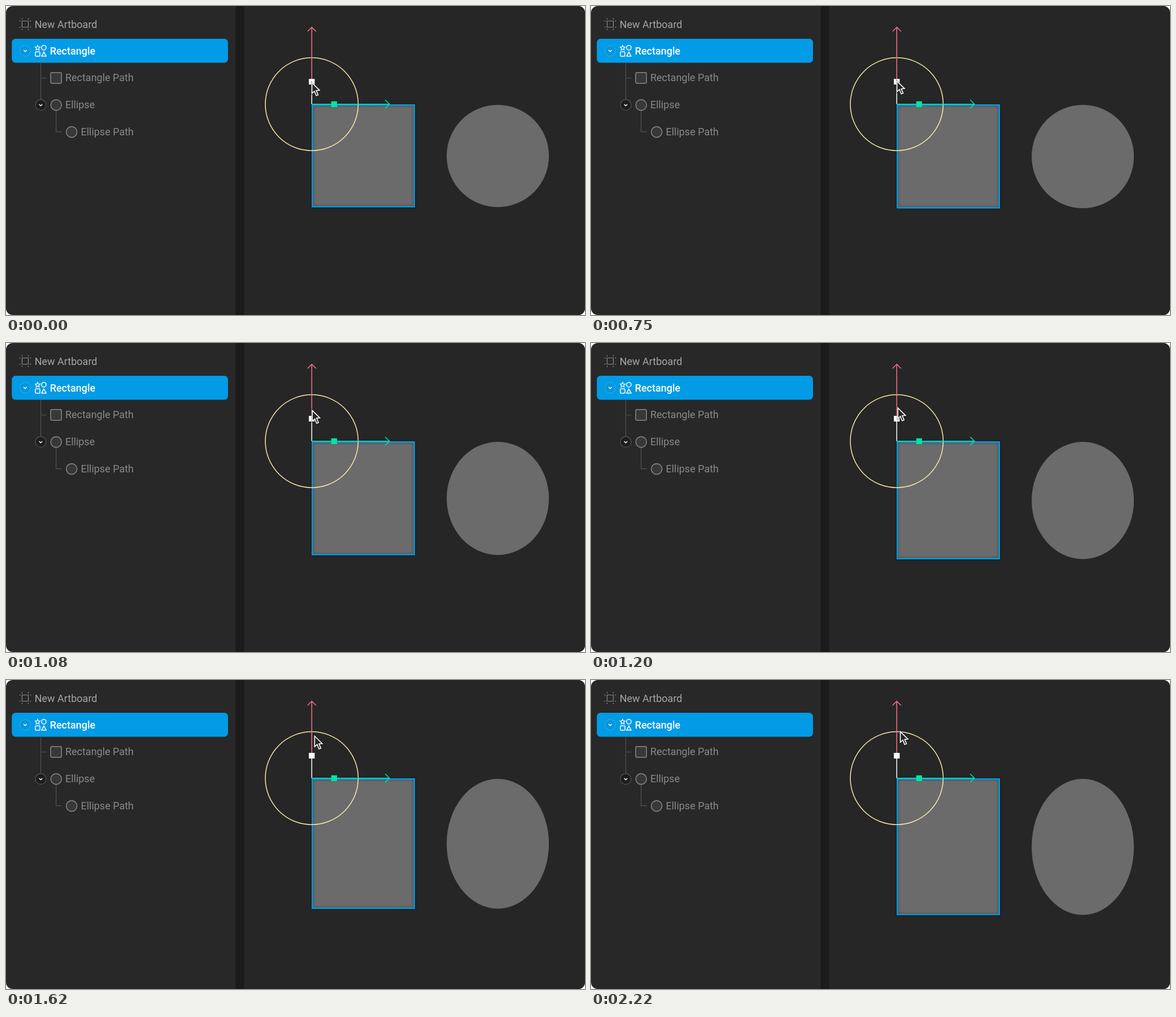
These frames come from a looping animation (1025 px wide and 547 px high, 2.52 s). An HTML page with a canvas:

```html
<!DOCTYPE html>
<html lang="en">
<head>
<meta charset="utf-8">
<title>Scaling a shape</title>
<style>
html, body { margin: 0; width: 100%; height: 100%; overflow: hidden; background: #fff; }
canvas { display: block; width: 1025px; height: 547px; }
</style>
</head>
<body>
<canvas id="stage" width="1025" height="547"></canvas>
<script>
const ctx = document.getElementById('stage').getContext('2d');
const LOOP = 2520, STEP = 30;
const BLUE = '#019be6', GREEN = '#00e5a5', RED = '#ff6f8b', YELLOW = '#f8e9a6';
const GREY = '#898989', LINE = '#545454', SHAPE = '#6b6b6b';

// Key poses: time, growth of the shapes, cursor x, cursor y
const keys = [
  [0, 0, 541.6, 136],
  [600, 0, 541.6, 136],
  [750, 2, 541.6, 133],
  [960, 12.2, 541.6, 124],
  [1200, 26.4, 543.2, 115],
  [1410, 37.7, 544.6, 107],
  [1830, 56.3, 547.5, 94],
  [2160, 59.8, 547.6, 91.7],
  [2220, 59.8, 547.6, 91.5],
  [LOOP, 59.8, 547.6, 91.5]
];

const slope = (i, c) => (keys[i + 1][c] - keys[i][c]) / (keys[i + 1][0] - keys[i][0]);

// Tangent that never overshoots the neighbouring keys
function tangent(i, c) {
  if (i === 0 || i === keys.length - 1) return 0;
  const a = slope(i - 1, c), b = slope(i, c);
  return a * b <= 0 ? 0 : 2 * a * b / (a + b);
}

function track(t, c) {
  let i = 0;
  while (i < keys.length - 2 && t >= keys[i + 1][0]) i++;
  const span = keys[i + 1][0] - keys[i][0];
  const u = (t - keys[i][0]) / span, v = 1 - u;
  return keys[i][c] * v * v * (1 + 2 * u) + keys[i + 1][c] * u * u * (3 - 2 * u) +
    span * u * v * (tangent(i, c) * v - tangent(i + 1, c) * u);
}

function paint(fill, stroke, width = 1.5) {
  if (fill) { ctx.fillStyle = fill; ctx.fill(); }
  if (stroke) { ctx.strokeStyle = stroke; ctx.lineWidth = width; ctx.stroke(); }
}

function poly(points, fill, stroke, width, closed) {
  ctx.beginPath();
  points.forEach(([x, y]) => ctx.lineTo(x, y));
  if (closed) ctx.closePath();
  paint(fill, stroke, width);
}

const line = (points, color, width) => poly(points, null, color, width, false);

function ellipse(x, y, rx, ry, fill, stroke, width) {
  ctx.beginPath();
  ctx.ellipse(x, y, rx, ry, 0, 0, Math.PI * 2);
  paint(fill, stroke, width);
}

const circle = (x, y, r, fill, stroke, width) => ellipse(x, y, r, r, fill, stroke, width);

function box(x, y, w, h, r, fill, stroke, width) {
  ctx.beginPath();
  ctx.roundRect(x, y, w, h, r);
  paint(fill, stroke, width);
}

function label(text, x, y, color, weight = 400) {
  ctx.font = `${weight} 18px Roboto, sans-serif`;
  ctx.fillStyle = color;
  ctx.fillText(text, x, y);
}

function caret(x, y, fill, ring) {
  circle(x, y, 9.5, fill, ring, 1.2);
  line([[x - 2.8, y - 1.3], [x, y + 1.5], [x + 2.8, y - 1.3]], '#fff', 1.4);
}

function artboardIcon() {
  box(28.5, 26.5, 11, 11, 0, null, GREY, 1.2);
  for (const x of [28.5, 39.5]) {
    line([[x, 21.5], [x, 24]], GREY, 1.2);
    line([[x, 40], [x, 42.5]], GREY, 1.2);
  }
  for (const y of [26.5, 37.5]) {
    line([[23.5, y], [26, y]], GREY, 1.2);
    line([[42, y], [44.5, y]], GREY, 1.2);
  }
}

function shapesIcon() {
  const star = [];
  for (let i = 0; i < 10; i++) {
    const a = i * Math.PI / 5 - Math.PI / 2, r = i % 2 ? 2.2 : 4.6;
    star.push([56 + r * Math.cos(a), 74.2 + r * Math.sin(a)]);
  }
  poly(star, null, '#fff', 1.3, true);
  circle(67, 73.8, 4.1, null, '#fff', 1.5);
  box(52, 81, 8, 8, 1.5, null, '#fff', 1.5);
  poly([[67, 81.3], [71, 88.8], [63, 88.8]], null, '#fff', 1.5, true);
}

function sidebar() {
  artboardIcon();
  label('New Artboard', 50.7, 39, '#a6a6a6');

  box(10.3, 58, 382.7, 42.5, 6.5, BLUE);
  caret(34, 79.3, '#0795dc', '#25a9ea');
  shapesIcon();
  label('Rectangle', 77.7, 85.5, '#fff', 500);

  line([[61.5, 100.5], [61.5, 165]], LINE, 1.2);
  line([[61.5, 127.5], [71.5, 127.5]], LINE, 1.2);
  line([[88.7, 185], [88.7, 222.7], [98.5, 222.7]], LINE, 1.2);

  box(79.2, 117.7, 19, 19, 2, '#383838', GREY);
  label('Rectangle Path', 104.9, 133.4, GREY);
  caret(61.5, 175.2, '#1d1d1d', LINE);
  circle(88.8, 175.2, 9.5, '#383838', GREY);
  label('Ellipse', 104.9, 181.4, GREY);
  circle(116.2, 223, 9.5, '#383838', GREY);
  label('Ellipse Path', 132.4, 229.2, GREY);
}

function shapes(grow) {
  const h = 181 + grow;
  ellipse(870.6, 175 + h / 2, 90.5, h / 2, SHAPE);
  box(542.3, 175.2, 180.5, h - 0.9, 0, SHAPE);
  ctx.save();
  ctx.shadowColor = 'rgba(0,0,0,.45)';
  ctx.shadowBlur = 4;
  box(542.3, 175.2, 180.5, h - 0.9, 0, null, BLUE, 2.4);
  ctx.restore();
}

function gizmo() {
  const x = 541.3, y = 173.8;
  circle(x, y, 82.2, null, YELLOW, 1.5);
  line([[x, 134], [x, 37.5]], RED, 1.5);
  line([[x - 7.5, 45], [x, 37.5], [x + 7.5, 45]], RED, 1.5);
  line([[x, y], [x, 134]], '#fff', 1.5);
  line([[x, y], [678.8, y]], GREEN, 1.5);
  line([[671.3, y - 7.5], [678.8, y], [671.3, y + 7.5]], GREEN, 1.5);
  box(x - 5.1, 128.9, 10.2, 10.2, 0, '#fff');
  box(575.8, y - 5.1, 10.2, 10.2, 0, GREEN);
}

function cursor(x, y) {
  const arrow = [[0, 0], [0, 18.8], [4.4, 14.9], [7.7, 22.8], [11, 21.4], [7.7, 13.6], [13.4, 13.2]];
  ctx.save();
  ctx.translate(x, y);
  poly(arrow, null, 'rgba(20,20,20,.55)', 3.2, true);
  poly(arrow, '#252525', '#fff', 1.6, true);
  ctx.restore();
}

function draw(t) {
  ctx.clearRect(0, 0, 1025, 547);
  ctx.save();
  ctx.beginPath();
  ctx.roundRect(0, 0, 1025, 547, 12);
  ctx.clip();
  box(0, 0, 1025, 547, 0, '#282828');
  box(421.5, 0, 603.5, 547, 0, '#262626');
  box(406.5, 0, 15, 547, 0, '#1b1b1b');
  sidebar();
  shapes(track(t, 1));
  gizmo();
  cursor(track(t, 2), track(t, 3));
  ctx.restore();
}

const start = performance.now();
function tick() {
  const t = (performance.now() - start) % LOOP;
  draw(Math.floor(t / STEP) * STEP);
  requestAnimationFrame(tick);
}
tick();
</script>
</body>
</html>
```
